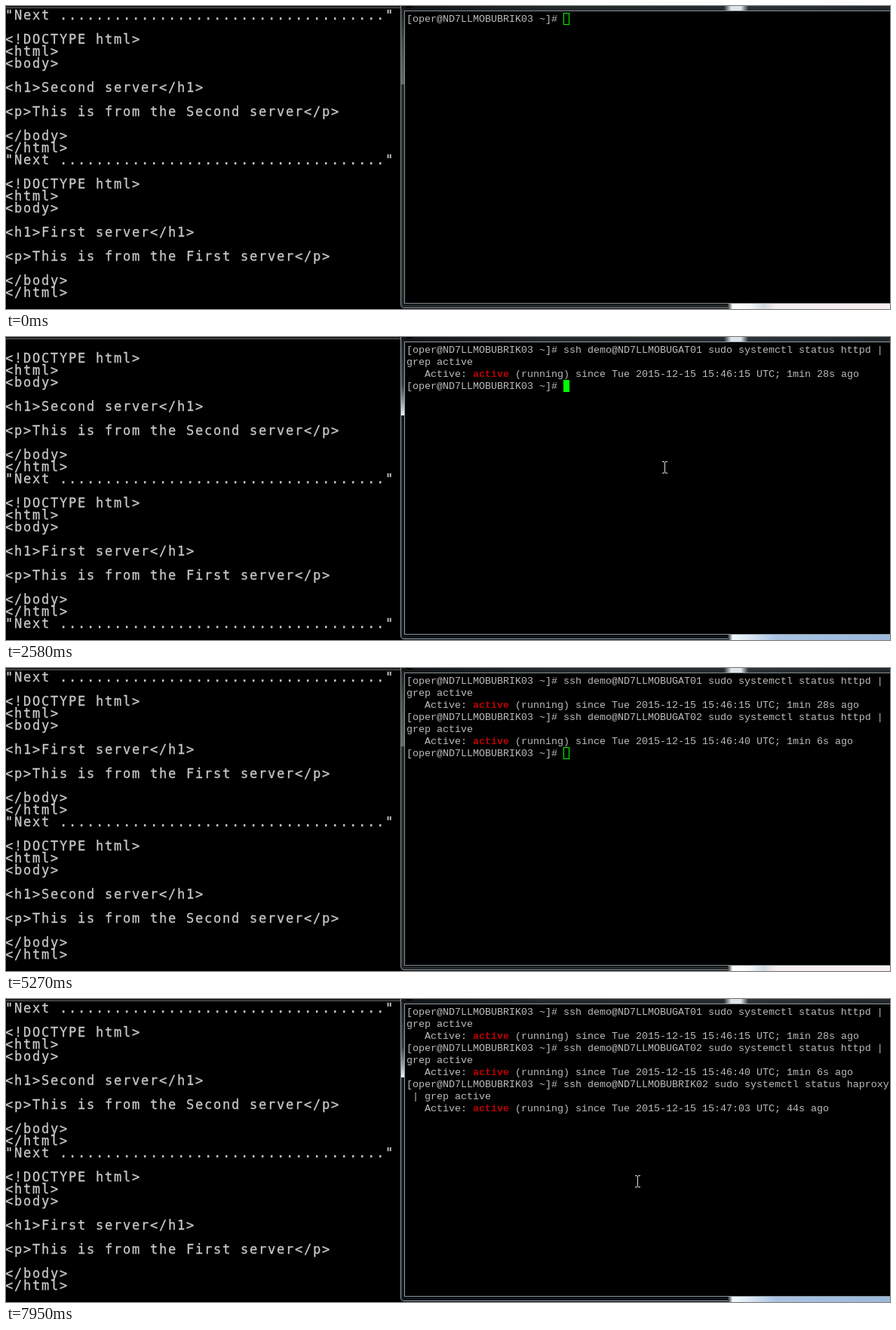
Animation, 1172 px wide and 402 px high, one loop 8 s. Source, as an HTML page with a canvas:

```html
<!DOCTYPE html>
<html lang="en">
<head>
<meta charset="utf-8">
<title>Load balancer terminals</title>
<style>
html, body { margin: 0; width: 1172px; height: 402px; overflow: hidden; background: #000; }
canvas { position: absolute; left: 0; top: 0; }
pre { position: absolute; margin: 0; line-height: 16px; white-space: pre; overflow: hidden; }
#log { left: -1px; top: 4px; width: 524px; height: 384px; color: #c8c8c8;
  font-family: "DejaVu Sans Mono", monospace; font-size: 17px; letter-spacing: 1.765px;
  -webkit-text-stroke: 0.3px #c8c8c8; }
#term { left: 531px; top: 10px; width: 641px; height: 384px; color: #bbb;
  font-family: "Liberation Mono", monospace; font-size: 13.333px; }
#term b { color: #bb0000; }
</style>
</head>
<body>
<canvas id="stage" width="1172" height="402"></canvas>
<pre id="log"></pre>
<pre id="term"></pre>
<canvas id="top" width="1172" height="402"></canvas>
<script>
const LOOP = 8000, COLS = 80, CELL = 8, ROW = 16;
const $ = id => document.getElementById(id);
const back = $('stage').getContext('2d');
const front = $('top').getContext('2d');
const log = $('log'), term = $('term');

const PROMPT = '[oper@ND7LLMOBUBRIK03 ~]# ';
const JOBS = [
  { host: 'ND7LLMOBUGAT01', unit: 'httpd', since: '15:46:15', age: '1min 28s', paste: 2120, reply: 2120, ready: 2120 },
  { host: 'ND7LLMOBUGAT02', unit: 'httpd', since: '15:46:40', age: '1min 6s', paste: 4120, reply: 4270, ready: 4270 },
  { host: 'ND7LLMOBUBRIK02', unit: 'haproxy', since: '15:47:03', age: '44s', paste: 6190, reply: 6340, ready: 6490 }
];
const FOCUS = [[1970, 3350], [3970, 5270], [6040, 7020], [7800, LOOP]];
const SCROLL = [[0, 0], [2580, 1], [2730, 12], [5580, 13], [5890, 24]];
const CLEARED = 7950;

// [start, x, y]; a null x hides the pointer
const POINTER = [
  [0, null], [1060, 961, 185], [1210, 936, 181], [1360, 908, 177], [1510, 885, 174],
  [1660, 873, 173], [2730, 980, 176], [2850, 1093, 180], [3350, null],
  [3970, 917, 182], [4580, 950, 189], [4730, 983, 196], [5270, null], [7800, 837, 242]
];

const last = (list, t) => list.filter(e => e[0] <= t).pop();
const esc = s => s.replace(/&/g, '&amp;').replace(/</g, '&lt;');

function page(name) {
  return ['"Next ' + '.'.repeat(36) + '"', '', '<!DOCTYPE html>', '<html>', '<body>', '',
    `<h1>${name} server</h1>`, '', `<p>This is from the ${name} server</p>`, '', '</body>', '</html>'];
}
const PAGES = ['Second', 'First', 'Second', 'First'].flatMap(page);

function terminal(t) {
  const rows = [];
  let ready = true;
  for (const j of JOBS) {
    if (t < j.paste) break;
    const cmd = `${PROMPT}ssh demo@${j.host} sudo systemctl status ${j.unit} | grep active`;
    rows.push(esc(cmd.slice(0, COLS)), esc(cmd.slice(COLS)));
    if (t >= j.reply)
      rows.push(`   Active: <b>active</b> (running) since Tue 2015-12-15 ${j.since} UTC; ${j.age} ago`);
    ready = t >= j.ready;
  }
  const cursor = { row: rows.length, col: ready ? PROMPT.length : 0, on: t < CLEARED };
  if (ready && cursor.on) rows.push(esc(PROMPT));
  return { html: rows.join('\n'), cursor };
}

function box(c, color, x, y, w, h) {
  c.fillStyle = color;
  c.fillRect(x, y, w, h);
}

function fade(c, x, y, w, h, stops, down) {
  const g = down ? c.createLinearGradient(0, y, 0, y + h) : c.createLinearGradient(x, 0, x + w, 0);
  stops.forEach(([at, color]) => g.addColorStop(at, color));
  box(c, g, x, y, w, h);
}

function frame(c, active) {
  box(c, '#000', 0, 0, 1172, 402);
  box(c, '#1c1e1f', 0, 0, 523, 2);
  box(c, '#5b6062', 0, 2, 523, 1);

  // glass title edge with a highlight
  fade(c, 524, 0, 648, 6, [[0, '#121517'], [0.3, '#23282b'], [0.66, '#262b2f'],
    [0.675, '#dfe5ea'], [0.695, '#dfe5ea'], [0.71, '#2c3237'], [1, '#22272b']]);
  box(c, '#000', 530, 0, 9, 2);

  fade(c, 524, 4, 4, 100, active
    ? [[0, '#1a1f22'], [0.6, '#3c4246'], [0.85, '#a2a8ac'], [1, '#f2f4f5']]
    : [[0, '#1e2123'], [0.4, '#44484b'], [1, '#64696c']], true);
  box(c, active ? '#101b20' : '#24282b', 524, 104, 4, 292);
  box(c, active ? '#0c151a' : '#24282b', 524, 396, 434, 4);

  c.lineWidth = 1;
  c.strokeStyle = active ? '#99a6ad' : '#8b9296';
  c.beginPath();
  c.moveTo(523.5, 0);
  c.lineTo(523.5, 396);
  c.quadraticCurveTo(523.5, 400.5, 528, 400.5);
  c.lineTo(1172, 400.5);
  c.stroke();

  fade(c, 957, 395, 215, 7, active
    ? [[0, '#1b2730'], [0.03, '#f4f8fc'], [0.12, '#dfeaf6'], [0.3, '#a9c3e2'], [1, '#9bb9dc']]
    : [[0, '#34383b'], [0.03, '#ffffff'], [0.14, '#f4f6f8'], [0.22, '#d5dade'], [0.3, '#f5eeee'], [1, '#f7eeee']]);

  box(c, '#000', 529, 7, 643, 388);
  c.strokeStyle = active ? '#8c999f' : '#858d91';
  c.strokeRect(528.5, 6.5, 660, 388);
}

function pointer(c, x, y) {
  for (const end of [y - 8, y + 7]) {
    box(c, '#ddd', x - 3, end, 3, 1);
    box(c, '#ddd', x + 1, end, 3, 1);
  }
  box(c, '#ddd', x, y - 7, 1, 14);
}

function caret(c, { row, col, on }, active) {
  if (!on) return;
  const x = 531 + col * CELL, y = 9 + row * ROW;
  if (active) return box(c, '#0f0', x, y, 8, 16);
  c.strokeStyle = '#0f0';
  c.lineWidth = 1;
  c.strokeRect(x + 0.5, y + 0.5, 7, 15);
}

function setHtml(el, html) {
  if (el.shown !== html) el.innerHTML = el.shown = html;
}

function draw(now) {
  const t = now % LOOP;
  const active = FOCUS.some(([a, b]) => t >= a && t < b);
  const offset = last(SCROLL, t)[1];
  const { html, cursor } = terminal(t);
  const [, x, y] = last(POINTER, t);

  frame(back, active);
  setHtml(log, esc(PAGES.slice(offset, offset + 24).join('\n')));
  setHtml(term, html);

  front.clearRect(0, 0, 1172, 402);
  caret(front, cursor, active);
  if (x != null) pointer(front, x, y);
}

const start = performance.now();
function tick() {
  draw(performance.now() - start);
  requestAnimationFrame(tick);
}
tick();
</script>
</body>
</html>
```
